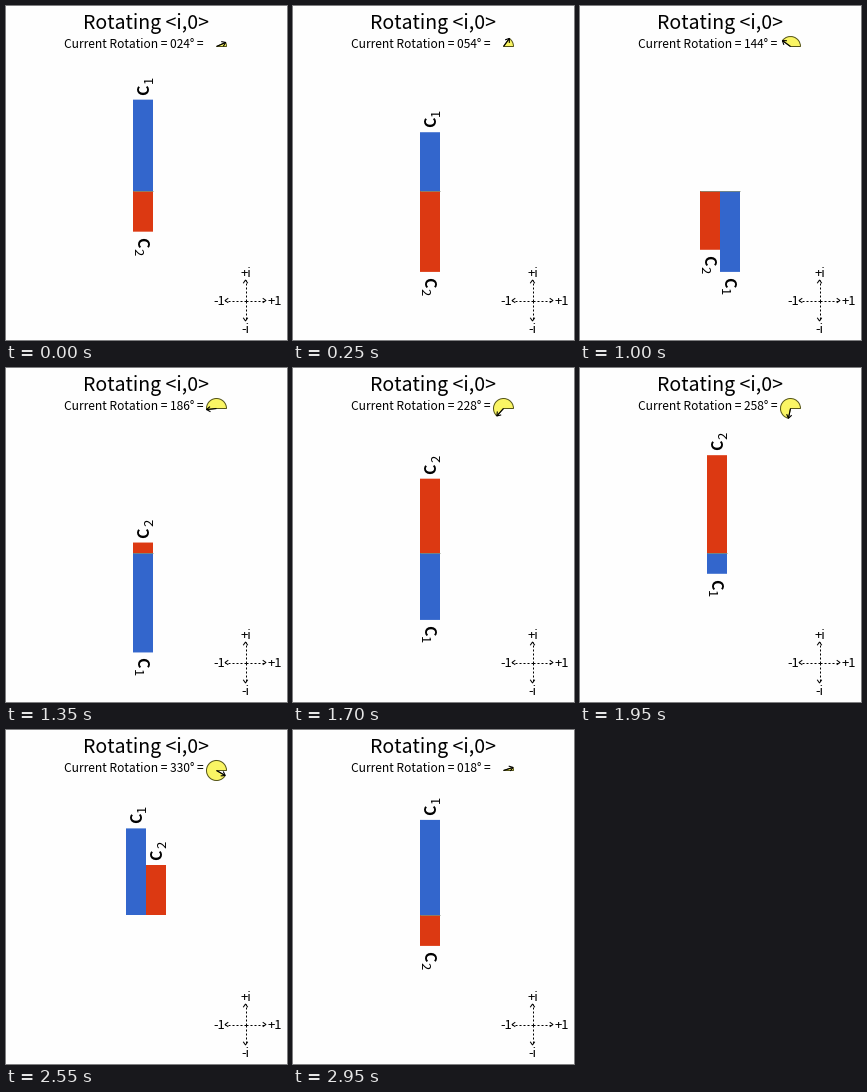
Write a matplotlib script that moves like this. It is 281x334 px and loops after 3 s.

```python
import math

import matplotlib.pyplot as plt
from matplotlib.animation import FuncAnimation
from matplotlib.patches import Rectangle, Wedge

W, H, DPI = 281, 334, 100
FRAMES, INTERVAL = 60, 50
START, STEP = 24, 6             # degrees
BLUE, RED, YELLOW, INK = "#3366cc", "#dc3912", "#faf564", "#000000"
MID, PAIR_MID, BASE, BAR_W, FULL = 137, 140, 185, 20, 100
DIAL, RADIUS = (210.5, 40.5), 10
FONT = "Noto Sans CJK JP"

fig = plt.figure(figsize=(W / DPI, H / DPI), dpi=DPI, facecolor="#fefefe")
ax = fig.add_axes([0, 0, 1, 1])
ax.set_xlim(0, W)
ax.set_ylim(H, 0)
ax.axis("off")


def px(n):
    return n * 72 / DPI


def text(x, y, s, size, ha="left", **kw):
    return ax.text(x, y, s, fontsize=px(size), family=FONT, color=INK,
                   ha=ha, va="baseline", **kw)


def stroke(xs, ys, width=1.0, color=INK, **kw):
    return ax.plot(xs, ys, color=color, lw=px(width), solid_capstyle="butt",
                   solid_joinstyle="miter", **kw)[0]


def polar(center, r, deg):
    a = math.radians(deg)
    return center[0] + r * math.cos(a), center[1] - r * math.sin(a)


def arrow_head(tip, deg, size):
    """Points of an open arrow head whose tip points along deg."""
    return zip(polar(tip, size, deg + 145), tip, polar(tip, size, deg - 145))


def draw_compass(center=(239.5, 294.5), reach=20.5):
    for deg in (0, 90, 180, 270):
        tip = polar(center, reach, deg)
        stroke(*zip(center, tip), dashes=(2, 2))
        stroke(*arrow_head(tip, deg, 4))
    text(239.5, 271, "+i", 13, "center")
    text(239.5, 327, "-i", 13, "center")
    text(219, 299, "-1", 13, "right")
    text(261.5, 299, "+1", 13)


class Bar:
    """A vertical bar with a rotated, subscripted name at its end."""

    def __init__(self, color, index):
        self.rect = ax.add_patch(Rectangle((0, BASE), BAR_W, 0,
                                           facecolor=color, lw=0, snap=False))
        self.name = text(0, 0, "C", 16, weight="bold", rotation_mode="anchor")
        self.sub = text(0, 0, index, 13, rotation_mode="anchor")

    def place(self, mid, value):
        end = BASE - FULL * value
        way = 1 if value > 0 else -1
        self.rect.set_bounds(mid - BAR_W / 2, min(end, BASE),
                             BAR_W, abs(end - BASE))
        self.name.set_position((mid + 6.5 * way, end - 5 * way))
        self.sub.set_position((mid + 10 * way, end - 16.5 * way))
        for label in (self.name, self.sub):
            label.set_rotation(90 * way)
            label.set_visible(abs(value) > 1e-6)


text(140, 23, "Rotating <i,0>", 19.5, "center")
caption = text(57.5, 42, "", 12)
draw_compass()

c1, c2 = Bar(BLUE, "1"), Bar(RED, "2")
zero_line = stroke([], [], color="#7f8c78", alpha=0.8)
wedge = ax.add_patch(Wedge(DIAL, RADIUS, 0, 0, facecolor=YELLOW,
                           edgecolor="#55551a", lw=px(1)))
hand = stroke([], [], 1.1)
hand_head = stroke([], [], 1.1)


def update(i):
    deg = (START + STEP * i) % 360
    a = math.radians(deg)
    v1, v2 = math.cos(a), -math.sin(a)

    # Bars of equal sign stand side by side, otherwise they are stacked.
    paired = v1 * v2 > 1e-6
    mid = PAIR_MID if paired else MID
    shift = math.copysign(BAR_W / 2, v1) if paired else 0
    c1.place(mid - shift, v1)
    c2.place(mid + shift, v2)
    half = BAR_W if paired else BAR_W / 2
    zero_line.set_data([mid - half, mid + half], [BASE - 0.5] * 2)
    zero_line.set_visible(min(v1, v2) < 0)

    caption.set_text(f"Current Rotation = {deg:03d}° =")
    # The y axis points down, so a counter-clockwise sweep is negative.
    wedge.set_theta1(-deg)
    wedge.set_theta2(0)
    wedge.set_visible(deg > 0)
    tip = polar(DIAL, RADIUS, deg)
    hand.set_data(*zip(DIAL, tip))
    hand_head.set_data(*arrow_head(tip, deg, 4.5))
    return ()


anim = FuncAnimation(fig, update, frames=FRAMES, interval=INTERVAL,
                     repeat=True, repeat_delay=0, blit=False)
plt.show()
```
